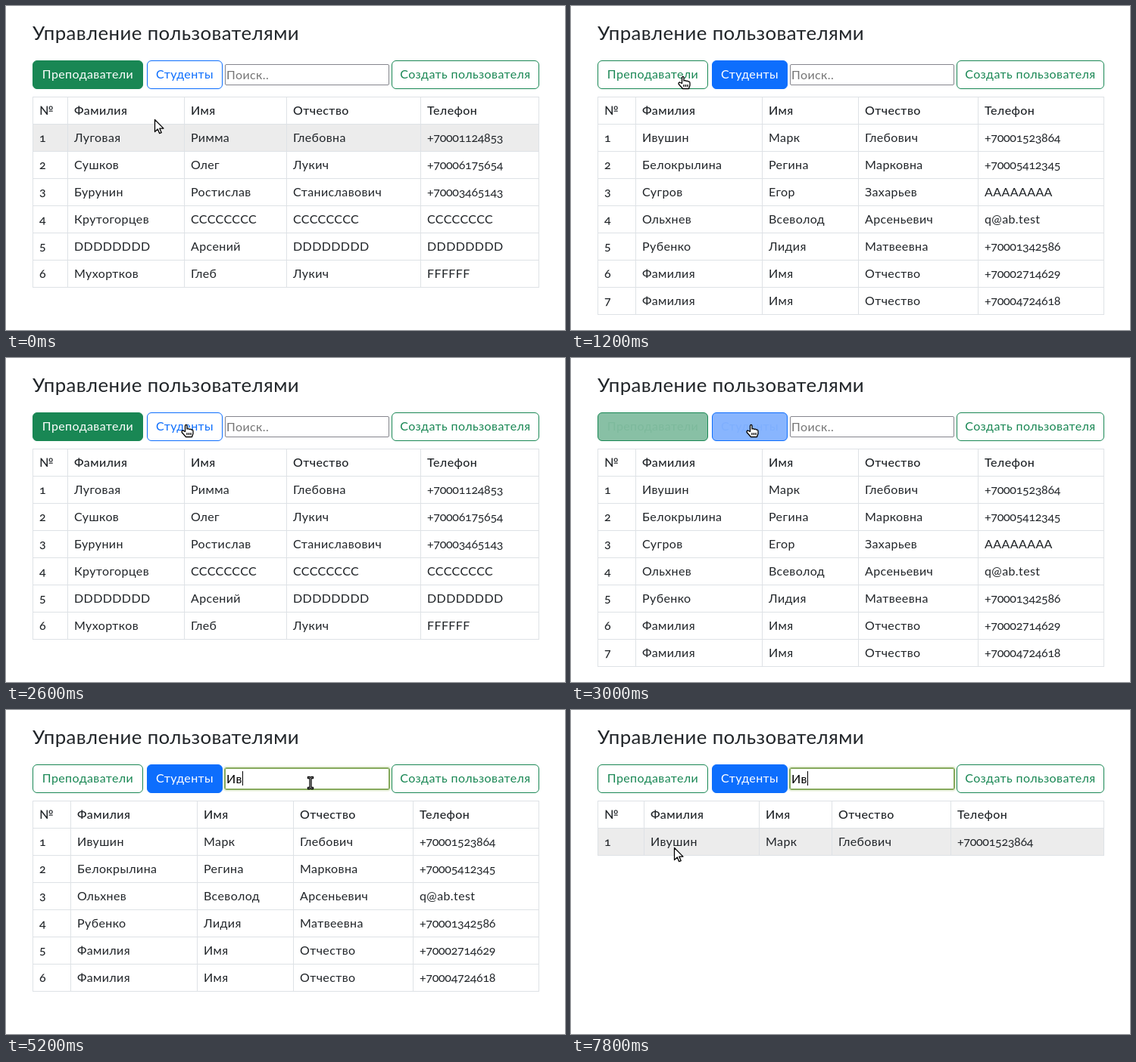
An HTML page for the animation above (8 s loop, 738x429 px).

```html
<!DOCTYPE html>
<html lang="ru">
<head>
<meta charset="utf-8">
<title>Управление пользователями</title>
<style>
  * { box-sizing: border-box; }
  html, body { margin: 0; width: 100%; height: 100%; overflow: hidden; background: #fff; }
  body { position: relative; color: #212529; white-space: nowrap;
    font: 400 16px/24px Lato, "Open Sans", sans-serif; letter-spacing: .025em;
    font-variant-numeric: oldstyle-nums; }
  h1 { position: absolute; left: 35px; top: 20px; margin: 0; font-size: 25.8px; line-height: 30px; font-weight: 400; }
  .btn { position: absolute; top: 72px; height: 38px; border: 1px solid; border-radius: 6px;
    line-height: 34px; text-align: center; }
  .green { color: #198754; border-color: #198754; }
  .blue { color: #0d6efd; border-color: #0d6efd; }
  #teachers { left: 35px; width: 146px; }
  #students { left: 186px; width: 100px; }
  #create { left: 509px; width: 195px; }
  #search { position: absolute; left: 289px; top: 77px; width: 217px; height: 28px; padding: 0 0 1px 1px;
    display: flex; align-items: center; border: 1px solid #85858d; border-radius: 2px; color: #000; }
  #search.hover { border-color: #5c5c64; }
  #search.focus { border-color: #86a95c; outline: 1px solid #86a95c; box-shadow: 0 0 0 3px #eef4e4; }
  #caret { width: 1px; height: 19px; margin-right: -1px; background: #000; }
  #hint { color: #757575; }
  #grid { position: absolute; left: 35px; top: 120px; display: grid; grid-auto-rows: 36px;
    border: solid #dee2e6; border-width: 1px 0 0 1px; }
  #grid div { padding-left: 8px; line-height: 34px; border: solid #dee2e6; border-width: 0 1px 1px 0; }
  #grid .b { font-weight: 500; }
  #grid .on { background: #ececec; }
  #grid .tel { letter-spacing: -.3px; }
  #cursor { position: absolute; left: 0; top: 0; overflow: visible; }
  #cursor path { fill: #fff; stroke: #000; stroke-width: 1.3; stroke-linejoin: round; }
</style>
</head>
<body>
<h1>Управление пользователями</h1>
<div class="btn green" id="teachers">Преподаватели</div>
<div class="btn blue" id="students">Студенты</div>
<div id="search"><span id="typed"></span><i id="caret"></i><span id="hint">Поиск..</span></div>
<div class="btn green" id="create">Создать пользователя</div>
<div id="grid"></div>
<svg id="cursor" width="20" height="20"><path/></svg>
<script>
const $ = id => document.getElementById(id);
const LOOP = 8000;

const head = ['№', 'Фамилия', 'Имя', 'Отчество', 'Телефон'];
const parse = text => text.trim().split('\n').map(line => line.trim().split(' '));
const people = {
  teachers: parse(`Луговая Римма Глебовна +70001124853
    Сушков Олег Лукич +70006175654
    Бурунин Ростислав Станиславович +70003465143
    Крутогорцев CCCCCCCC CCCCCCCC CCCCCCCC
    DDDDDDDD Арсений DDDDDDDD DDDDDDDD
    Мухортков Глеб Лукич FFFFFF`),
  students: parse(`Ивушин Марк Глебович +70001523864
    Белокрылина Регина Марковна +70005412345
    Сугров Егор Захарьев AAAAAAAA
    Ольхнев Всеволод Арсеньевич q@ab.test
    Рубенко Лидия Матвеевна +70001342586
    Фамилия Имя Отчество +70002714629
    Фамилия Имя Отчество +70004724618`)
};
const columns = {
  teachers: [46, 154, 135, 177, 156],
  students: [50, 167, 127, 158, 166],
  found: [61, 152, 96, 157, 202]
};
const shapes = {
  arrow: 'M.5.5V16.5L4.3 13L6.7 18.7L9.2 17.6L6.8 12.1H12Z',
  hand: 'M5.5 9.5V2Q5.5.5 6.8.5T8 2V6Q10.5 5 11 6.5Q13 5.5 13.5 7Q16 6.5 16 9V12L14.5 16.5H6.5L1.2 10.5Q.5 8.5 2.5 8ZM8 11V14M10.5 11V14M13 11V14',
  beam: 'M.5.5H3L4 1.2L5 .5H7.5V2.5H5V14.5H7.5V16.5H5L4 15.8L3 16.5H.5V14.5H3V2.5H.5Z'
};

// Button looks: [background, text colour]
const green = ['#198754', '#fff'], greenOff = ['#fff', '#198754'];
const blue = ['#0d6efd', '#fff'], blueOff = ['#fff', '#0d6efd'];

const steps = [
  [0, { list: 'teachers', cols: 'teachers', filter: '', row: 1, t: green, s: blueOff,
        input: '', text: '', caret: 0, cur: ['arrow', 196, 150] }],
  [200, { row: 0, cur: ['hand', 225, 88] }],
  [600, { list: 'students', cols: 'students', t: ['#97cab2', '#84bba0'], s: ['#75a9ff', '#98c0ff'], cur: ['arrow', 226, 117] }],
  [800, { t: greenOff, s: blue, cur: ['arrow', 212, 142] }],
  [1000, { cur: ['hand', 154, 101] }],
  [1200, { cur: ['hand', 141, 93] }],
  [2000, { list: 'teachers', cols: 'teachers', t: ['#d1e7dc', '#4aa57d'], s: ['#3a89ff', '#cfe2ff'] }],
  [2200, { t: green, s: blueOff, cur: ['arrow', 184, 115] }],
  [2400, { cur: ['hand', 233, 102] }],
  [2600, { cur: ['hand', 231, 88] }],
  [3000, { list: 'students', cols: 'students', t: ['#88c0a5', '#7db99c'], s: ['#88b5fe', '#7eaffe'] }],
  [3200, { t: greenOff, s: blue, input: 'hover', cur: ['beam', 381, 88] }],
  [3400, { cur: ['beam', 398, 88] }],
  [3600, { input: 'focus', caret: 1 }],
  [4800, { caret: 0 }],
  [5000, { text: 'И', filter: 'и', caret: 1 }],
  [5200, { text: 'Ив' }],
  [5600, { filter: 'ив', cols: 'found' }],
  [5800, { caret: 0 }],
  [7000, { caret: 1 }],
  [7200, { cur: ['beam', 406, 71] }],
  [7400, { cur: ['arrow', 402, 66] }],
  [7600, { cur: ['arrow', 212, 61] }],
  [7800, { row: 1, cur: ['arrow', 136, 182] }]
];
let last = {};
const states = steps.map(([at, change]) => ({ at, ...(last = { ...last, ...change }) }));

function paintGrid({ list, cols, filter, row }) {
  const rows = people[list].filter(p => p.join(' ').toLowerCase().includes(filter));
  const cells = [head, ...rows.map((p, i) => [i + 1, ...p])].flatMap((line, r) =>
    line.map((value, c) => {
      const cell = document.createElement('div');
      cell.textContent = value;
      cell.classList.toggle('b', !r || !c);
      cell.classList.toggle('on', r > 0 && r === row);
      cell.classList.toggle('tel', String(value)[0] === '+');
      return cell;
    }));
  $('grid').style.gridTemplateColumns = columns[cols].map(w => w + 'px').join(' ');
  $('grid').replaceChildren(...cells);
}

function paintButton(id, [background, color]) {
  Object.assign($(id).style, { background, color });
  $(id).style.borderColor = id === 'teachers' ? green[0] : blue[0];
}

function paint(s) {
  paintGrid(s);
  paintButton('teachers', s.t);
  paintButton('students', s.s);
  $('search').className = s.input;
  $('typed').textContent = s.text;
  $('hint').hidden = !!s.text;
  $('caret').style.visibility = s.caret ? 'visible' : 'hidden';
  const [shape, x, y] = s.cur;
  $('cursor').firstElementChild.setAttribute('d', shapes[shape]);
  $('cursor').style.transform = `translate(${x}px, ${y}px)`;
}

let shown;
const start = performance.now();
function tick() {
  const time = (performance.now() - start) % LOOP;
  const state = states.findLast(s => s.at <= time);
  if (state !== shown) paint(shown = state);
  requestAnimationFrame(tick);
}
tick();
</script>
</body>
</html>
```
